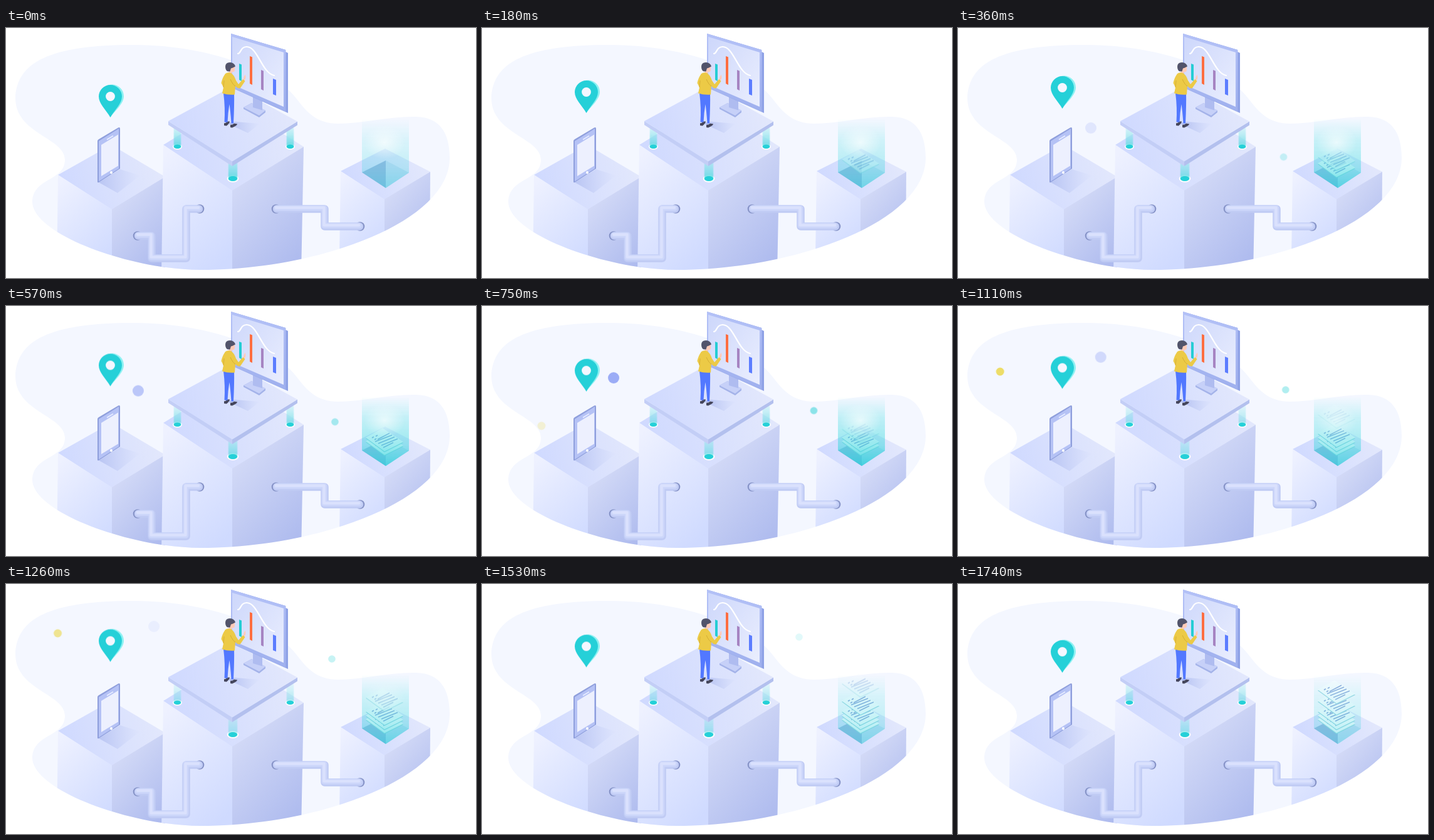
An HTML page for the animation above (1.77 s loop, 750 by 400 pixels).

```html
<!DOCTYPE html>
<html lang="en">
<head>
<meta charset="utf-8">
<title>Isometric data platform</title>
<style>
html, body { margin: 0; width: 100%; height: 100%; overflow: hidden; background: #fff; }
svg { display: block; width: 750px; height: 400px; }

.pin, .dot, .sheet, .beam, .cloud, .leg { animation: 1770ms linear infinite both; }

.pin { animation-name: bob; }
@keyframes bob {
  0%, 100% { transform: translateY(0); }
  20.34% { transform: translateY(-14px); }
  27% { transform: translateY(-19px); }
  42.37% { transform: translateY(-6.3px); }
  50% { transform: translateY(0); }
  55.93% { transform: translateY(-4.2px); }
  71.19% { transform: translateY(-18.5px); }
  73% { transform: translateY(-19px); }
  86.44% { transform: translateY(-9.8px); }
}

.leg { animation-name: pulse; }
@keyframes pulse {
  0%, 50%, 100% { opacity: 1; }
  27%, 73% { opacity: .5; }
}

.blue { animation-name: blue; }
@keyframes blue {
  0%, 13% { transform: translate(213px, 173px); opacity: 0; }
  20.34% { transform: translate(212px, 160px); opacity: .22; }
  42.37% { transform: translate(210px, 115px); opacity: 1; }
  55.93% { transform: translate(221px, 93px); opacity: .62; }
  71.19% { transform: translate(236px, 68px); opacity: .12; }
  75%, 100% { transform: translate(240px, 62px); opacity: 0; }
}

.yellow { animation-name: yellow; }
@keyframes yellow {
  0%, 38% { transform: translate(101px, 208px); opacity: 0; }
  42.37% { transform: translate(95px, 192px); opacity: .25; }
  55.93% { transform: translate(68.5px, 130.5px); opacity: 1; }
  60.5% { transform: translate(63px, 112px); opacity: .95; }
  71.19% { transform: translate(82.5px, 79px); opacity: .65; }
  83%, 100% { transform: translate(94px, 46px); opacity: 0; }
}

.teal { animation-name: teal; }
@keyframes teal {
  0%, 12% { transform: translate(513px, 224px); opacity: 0; }
  20.34% { transform: translate(519.5px, 206.5px); opacity: .26; }
  42.37% { transform: translate(529.5px, 167.5px); opacity: .55; }
  55.93% { transform: translate(525px, 145.5px); opacity: .48; }
  71.19% { transform: translate(520px, 120px); opacity: .28; }
  86.44% { transform: translate(506px, 85px); opacity: .15; }
  95%, 100% { transform: translate(499px, 68px); opacity: 0; }
}

.beam { animation-name: beam; }
@keyframes beam {
  0%, 100% { opacity: .5; }
  20.34% { opacity: .85; }
  42.37% { opacity: 1; }
  55.93% { opacity: .92; }
  71.19% { opacity: .75; }
  86.44% { opacity: .55; }
  98.3% { opacity: .45; }
}

.cloud { animation-name: cloud; }
@keyframes cloud {
  0%, 55%, 100% { opacity: .8; }
  71% { opacity: .4; }
  86%, 98% { opacity: 0; }
}

/* Sheets drop onto the pile one after another. */
.s1 { animation-name: drop1; }
.s2 { animation-name: drop2; }
.s3 { animation-name: drop3; }
.s4 { animation-name: drop4; }
.s5 { animation-name: drop5; }
@keyframes drop1 {
  0%, 2% { transform: translateY(-16px); opacity: 0; }
  16%, 100% { transform: none; opacity: 1; }
}
@keyframes drop2 {
  0%, 10% { transform: translateY(-16px); opacity: 0; }
  25%, 100% { transform: none; opacity: 1; }
}
@keyframes drop3 {
  0%, 33% { transform: translateY(-15px); opacity: 0; }
  52%, 100% { transform: none; opacity: 1; }
}
@keyframes drop4 {
  0%, 57% { transform: translateY(-20px); opacity: 0; }
  77%, 100% { transform: none; opacity: 1; }
}
@keyframes drop5 {
  0%, 79% { transform: translateY(-18px); opacity: 0; }
  97%, 100% { transform: none; opacity: 1; }
}
</style>
</head>
<body>
<svg viewBox="0 0 750 400" xmlns="http://www.w3.org/2000/svg">
  <defs>
    <path id="blob" d="M15 112C17 55 70 27 203 27C310 27 400 58 448 97C470 113 480 153 530 153C570 153 610 141 655 142C690 143 708 165 708 208C708 310 500 387 310 387C200 387 42 330 42 278C42 240 94 245 94 211C94 175 15 170 15 112Z"/>
    <clipPath id="inBlob"><use href="#blob"/></clipPath>

    <linearGradient id="top" x1="0" y1=".6" x2="1" y2=".4">
      <stop stop-color="#cfd9ff"/><stop offset="1" stop-color="#e3e8fc"/>
    </linearGradient>
    <linearGradient id="lit" x1=".2" y1="0" x2=".7" y2="1">
      <stop stop-color="#eef1ff"/><stop offset="1" stop-color="#cfdaff"/>
    </linearGradient>
    <linearGradient id="shade" x1=".2" y1="0" x2=".8" y2="1">
      <stop stop-color="#d9dff8"/><stop offset="1" stop-color="#adbaee"/>
    </linearGradient>
    <linearGradient id="fade">
      <stop stop-color="#a3b1ea" stop-opacity=".75"/><stop offset="1" stop-color="#b6c3f2" stop-opacity="0"/>
    </linearGradient>
    <linearGradient id="screen" x1="0" y1="0" x2="1" y2="1">
      <stop stop-color="#cdd7fb"/><stop offset="1" stop-color="#eaeefe"/>
    </linearGradient>
    <linearGradient id="frame" x1="0" y1="0" x2="0" y2="1">
      <stop stop-color="#b3c1f7"/><stop offset="1" stop-color="#9fb0ee"/>
    </linearGradient>
    <linearGradient id="legFill" x1="0" y1="0" x2="0" y2="1">
      <stop stop-color="#b4ecf3" stop-opacity=".6"/><stop offset="1" stop-color="#4ed6df"/>
    </linearGradient>
    <linearGradient id="beamFill" x1="0" y1="0" x2="0" y2="1">
      <stop stop-color="#4fe0e2" stop-opacity="0"/>
      <stop offset=".3" stop-color="#45dee2" stop-opacity=".3"/>
      <stop offset=".7" stop-color="#36d8de" stop-opacity=".5"/>
      <stop offset="1" stop-color="#25d0da" stop-opacity=".8"/>
    </linearGradient>
    <radialGradient id="glow">
      <stop stop-color="#fff" stop-opacity=".8"/><stop offset="1" stop-color="#fff" stop-opacity="0"/>
    </radialGradient>

    <g id="leg">
      <ellipse rx="7.5" ry="4.8" fill="#fff"/>
      <path class="leg" d="M-5.7-30H5.7V0A5.7 3 0 0 1-5.7 0Z" fill="url(#legFill)"/>
      <ellipse rx="5.7" ry="3.2" fill="#25d0d8"/>
    </g>

    <g id="sheet">
      <path d="M-30-1.5L-3-16L30 5.5L0 20.5Z" fill="#9fd6e3"/>
      <path d="M-30-3L-3-18L30 4L0 19Z" fill="#f7fbff"/>
      <path d="M-17-1L14-9.500M0 0" stroke="none"/>
      <g stroke="#8fa9dc" stroke-width="1.5" fill="none">
        <path d="M-20-2.500l3-1.700M-16 .5l3-1.700M-14-5l19-10.500" stroke-width="1.700" stroke-dasharray="3.400 60"/>
        <path d="M-11 0L8-10M-15 3.500L12-7M-10 6.500L16-4M-5 9.500L21-1M-2 13L14 5"/>
      </g>
    </g>

    <path id="pipeL" d="M211 332.500H232.500V368.500H287.500V289.500H308"/>
    <path id="pipeR" d="M432 289.500H508.500V317.500H564"/>
    <g id="pipes" fill="none" stroke-linejoin="round" stroke-linecap="round">
      <use href="#pipeL"/><use href="#pipeR"/>
    </g>
  </defs>

  <use href="#blob" fill="#f4f7ff"/>

  <g clip-path="url(#inBlob)">
    <!-- left block -->
    <path d="M83 235L168 187L254 238L169 291Z" fill="url(#top)"/>
    <path d="M83 235L169 290V395H81Z" fill="url(#lit)"/>
    <path d="M169 290L254 238V395H169Z" fill="url(#shade)"/>
    <!-- centre block -->
    <path d="M251 187L362 118L475 190L361 261Z" fill="url(#top)"/>
    <path d="M251 187L361 260V395H248Z" fill="url(#lit)"/>
    <path d="M361 260L475 190L471 395H361Z" fill="url(#shade)"/>
    <!-- right block -->
    <path d="M534 229L605 193L677 230L604 275Z" fill="url(#top)"/>
    <path d="M534 229L604 274V370H532Z" fill="url(#lit)"/>
    <path d="M604 274L677 230L676 370H604Z" fill="url(#shade)"/>
  </g>

  <!-- pipes -->
  <g fill="#8592c6">
    <circle cx="210" cy="332.500" r="7.300"/><circle cx="309" cy="289.500" r="7.300"/>
    <circle cx="431" cy="289.500" r="7.300"/><circle cx="565" cy="317.500" r="7.300"/>
  </g>
  <use href="#pipes" stroke="#c0cbf4" stroke-width="12.500"/>
  <use href="#pipes" stroke="#ccd6fa" stroke-width="9" transform="translate(-.6 -1.200)"/>
  <use href="#pipes" stroke="#dae1fd" stroke-width="4.500" transform="translate(-1 -2)"/>

  <!-- phone -->
  <path d="M148 247L182 226L214 236L178 264Z" fill="url(#fade)" opacity=".75"/>
  <path d="M146 181Q146 179 148 178L179 159.500Q182 158 182 161V225L148 247Q146 248 146 246Z" fill="#8f9fdc"/>
  <path d="M148 181L180 161V225L148 245.500Z" fill="#b5c2f5"/>
  <path d="M152 187L179 170.500V220.500L152 237Z" fill="#edf0fe"/>
  <path d="M161 178.500L171 172.500" stroke="#e8edff" stroke-width="1.500"/>
  <ellipse cx="168" cy="231.300" rx="1.900" ry="2.300" fill="#fff"/>

  <!-- platform -->
  <use href="#leg" x="273.500" y="189.800"/>
  <use href="#leg" x="453.500" y="189.800"/>
  <use href="#leg" transform="translate(362 241) scale(1.250)"/>
  <path d="M259 149L361 213V221L259 155Z" fill="#c3cef6"/>
  <path d="M361 213L465 149.500V155.500L361 221Z" fill="#b3c0ee"/>
  <path d="M259 149L362 93L465 149.500L361 213.500Z" fill="url(#top)"/>

  <!-- monitor -->
  <path d="M379 127L392 120L414 132V135L404 143L379 129.500Z" fill="#a4b3e9"/>
  <path d="M379 127L392 120L414 132L404 140Z" fill="#c6d0f8"/>
  <path d="M394 105L409 112V131.500L394 127Z" fill="#afbcf0"/>
  <path d="M359 9L446 35V38L450 40V136L359 95Z" fill="#8fa2e6"/>
  <path d="M359 9L446.500 35V134L359 95Z" fill="url(#frame)"/>
  <path d="M361 14L443 39V126L361 90.500Z" fill="url(#screen)"/>
  <path d="M370 41C375 41 374 30 384 30C402 30 408 72 428 76" fill="none" stroke="#fff" stroke-width="2.200" stroke-linecap="round"/>
  <path d="M372 57l4 1.500V85l-4-2z" fill="#25cdd4"/>
  <path d="M389 45l4 1.500V91l-4-2z" fill="#ff6e40"/>
  <path d="M407 67l4 1.700V100l-4-2z" fill="#a684c2"/>
  <path d="M426 81l5 2V108l-5-2z" fill="#5c7dff"/>

  <!-- person -->
  <path d="M352 152L366 150L405 153L386 168Z" fill="url(#fade)"/>
  <path d="M348 152Q350 153 353 149.500L357 149.500Q357 152 352 156.500L348 156Z" fill="#45465c"/>
  <path d="M358 155Q362 155 364 152.800L369 153.500Q369 156 361 159.500L358 159Z" fill="#45465c"/>
  <path d="M347 104H364Q364.500 122 363 152.500H359.500Q358 131 356.500 122Q354 136 353.500 151L348.500 150.500Q350 128 347 104Z" fill="#5278ff"/>
  <path d="M357 63L365 61.500V68Q364 71 361 70L360 74H355Z" fill="#ffcbb9"/>
  <path d="M350 62Q350 55 357.500 55Q364 55 366 61.500L361 64L359 64.500L357.500 69.500Q350 70.500 350 62Z" fill="#52546b"/>
  <path d="M378 84L380 77L382 74.500L382.500 80L380.500 85Z" fill="#ffcbb9"/>
  <path d="M350 73Q354 70 359 72Q364 75 367 84L371 90L378 82L381.500 85L374 96Q371 98 366 93L365 106.500Q355 107.500 345 104.500L347 95L343.500 88Q345 80 350 73Z" fill="#ecca46"/>
  <path d="M358 82Q362 91 366 93M347 95L348 84" fill="none" stroke="#d5ae35" stroke-width="1"/>

  <!-- location pin -->
  <g class="pin">
    <path d="M166.500 143C162 129 151 120 151 109A18.500 18.500 0 0 1 188 109C188 121 176 130 166.500 143Z" fill="#8df1f2"/>
    <path d="M166.500 143C159 130 148 121 148 109.500A18.500 18.500 0 0 1 185 109.500C185 121 174 130 166.500 143Z" fill="#25d0d8"/>
    <circle cx="166.500" cy="109.500" r="7.400" fill="#f4f7ff"/>
  </g>

  <!-- scanner -->
  <path d="M568 231L606 212V256Z" fill="#9bb5e2"/>
  <path d="M606 212L643 231.500L606 256Z" fill="#c5d8f6"/>
  <g class="sheet s1"><use href="#sheet" x="604" y="219.500"/></g>
  <g class="sheet s2"><use href="#sheet" x="604" y="213.500"/></g>
  <g class="sheet s3"><use href="#sheet" x="604" y="206.500"/></g>
  <g class="sheet s4"><use href="#sheet" x="604" y="190"/></g>
  <g class="sheet s5"><use href="#sheet" x="604" y="172"/></g>
  <path class="beam" d="M568 145H643V231.500L606 256L568 231Z" fill="url(#beamFill)"/>
  <ellipse class="cloud" cx="604" cy="183" rx="33" ry="27" fill="url(#glow)"/>

  <!-- floating dots -->
  <circle class="dot blue" r="9" fill="#9bacf6"/>
  <circle class="dot yellow" r="6.500" fill="#ecda55"/>
  <circle class="dot teal" r="5.800" fill="#36d3d8"/>
</svg>
</body>
</html>
```
